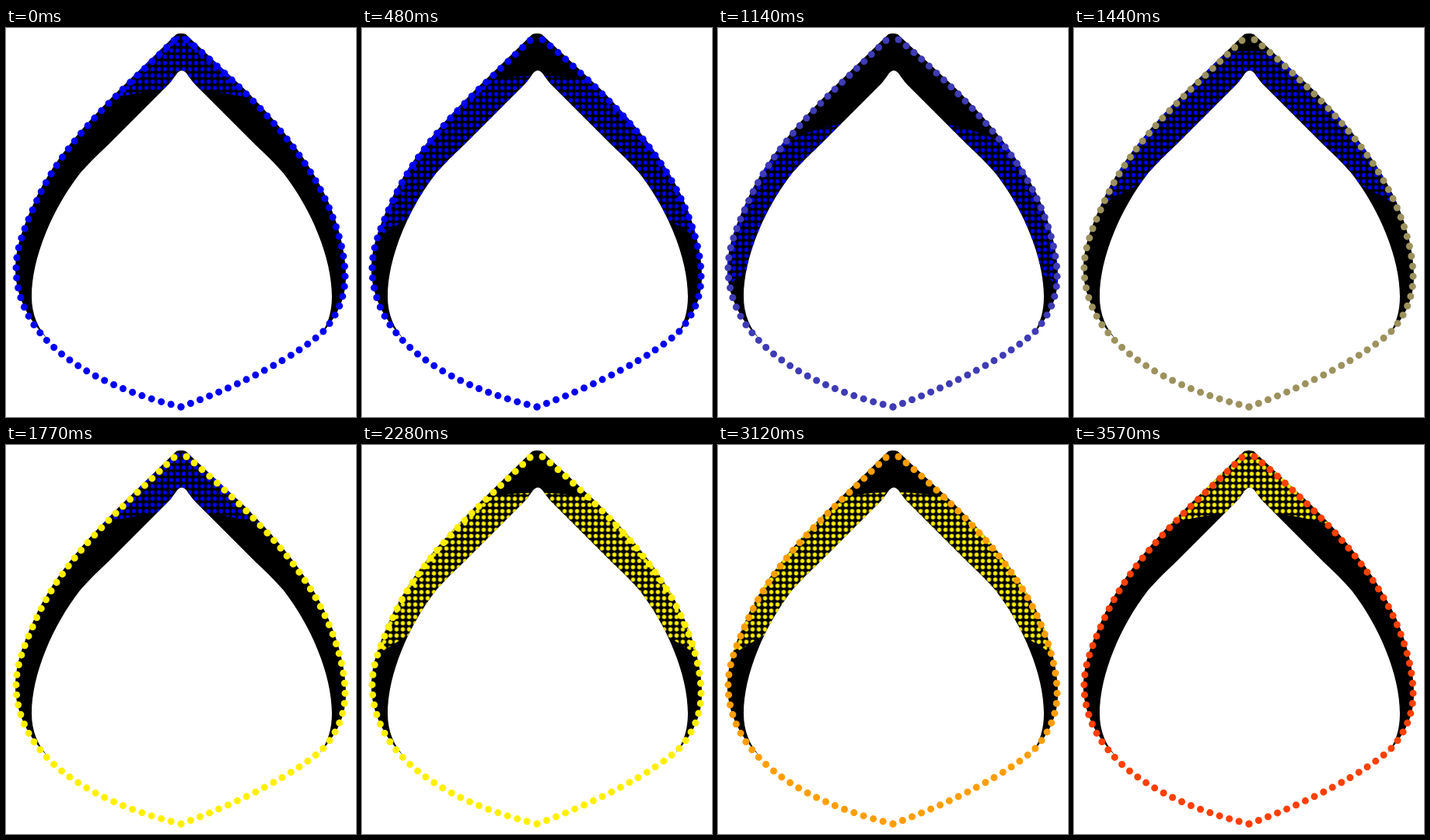
Write an HTML page without scripts that moves like this. It is 450 px wide and 500 px high and loops after 3.6 s.

```html
<!DOCTYPE html>
<html lang="en">
<head>
<meta charset="utf-8">
<title>Dotted drop</title>
<style>
  :root { --blue: #0000f0; --yellow: #fff000; --orange: #ff4000; }
  html, body { margin: 0; width: 100%; height: 100%; overflow: hidden; background: #fff; }
  svg { display: block; width: 450px; height: 500px; }

  .ring {
    fill: none;
    stroke-width: 9;
    stroke-linecap: round;
    stroke-dasharray: 0 1;
    animation: ring-color 3.6s linear infinite;
  }
  .grid-dot { animation: grid-color 3.6s step-end infinite; }
  .band { animation: sweep 1.8s linear infinite; }

  @keyframes ring-color {
    0%, 26% { stroke: var(--blue); }
    49%, 76% { stroke: var(--yellow); }
    99%, 100% { stroke: var(--orange); }
  }
  @keyframes grid-color {
    0% { fill: var(--blue); }
    50%, 100% { fill: var(--yellow); }
  }
  /* The band runs down the drop and back up, gaining speed towards the base. */
  @keyframes sweep {
    0%, 100% { transform: translateY(79px); }
    26.667%, 73.333% { transform: translateY(203px); }
    36.667%, 63.333% { transform: translateY(259px); }
    50% { transform: translateY(346px); }
  }
</style>
</head>
<body>
<svg viewBox="0 0 450 500">
  <defs>
    <path id="hood" d="M219 8 Q225 6 231 8 L302 74
      C343 114 386 163 412 218 C427 250 437 288 437 319 C437 348 426 372 403 396
      C414 382 419 365 419 345 C419 295 392 232 357 187 C346 174 333 162 320 149.5
      L243 72.5 C239 68 236 64 232 58 Q226 51 220 58 C216 64 213 68 209 72.5
      L132 149.5 C119 162 106 174 95 187 C60 232 33 295 33 345 C33 368 41 387 56 402
      C26 374 12 341 12 309 C12 280 24 251 37 222 C64 163 108 117 148 77 Z"/>
    <clipPath id="hood-clip"><use href="#hood"/></clipPath>
    <clipPath id="band-clip">
      <path class="band" d="M0 -60 A350 350 0 0 1 450 -60 V82 A350 350 0 0 0 0 82 Z"/>
    </clipPath>
    <pattern id="grid" x="0.5" y="1" width="8" height="8" patternUnits="userSpaceOnUse">
      <circle class="grid-dot" cx="4" cy="4" r="2.7"/>
    </pattern>
  </defs>

  <use href="#hood"/>
  <g clip-path="url(#hood-clip)">
    <rect width="450" height="500" fill="url(#grid)" clip-path="url(#band-clip)"/>
  </g>

  <path class="ring" pathLength="51.01" d="M216 16 L150 79 C110 118 66 164 39 223
    C26 252 13 280 13 309 C13 341 26 371 44 392 C79 435 145 468 225 487"/>
  <path class="ring" pathLength="51.01" d="M232 15 C254 32 278 55 300 76 C341 116 384 164 410 219
    C425 251 436 288 436 319 C436 348 425 371 407 391 C374 421 303 459 225 487"/>
</svg>
</body>
</html>
```
